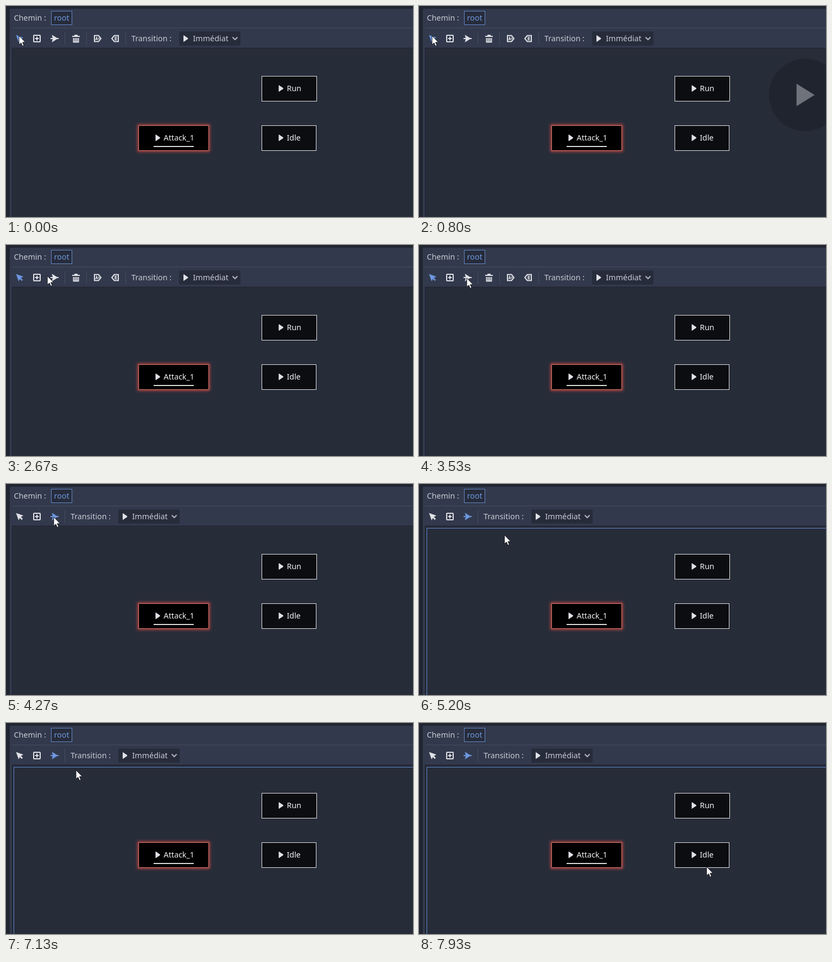
An HTML page that plays this animation: 750 by 389 pixels, repeating every 8 s.

```html
<!DOCTYPE html>
<html lang="fr">
<head>
<meta charset="utf-8">
<title>State machine editor</title>
<style>
  html, body { margin: 0; width: 100%; height: 100%; overflow: hidden; background: #202531; }
  svg { display: block; width: 100vw; height: 100vh; }
  text { font: 14.3px "Noto Sans", "Open Sans", sans-serif; fill: #c9ccd5; }
  .node text { fill: #f1f1f2; }
  .line { fill: none; stroke: #e0e2e7; stroke-width: 2; }
  .solid { fill: #e0e2e7; }
  .sep { stroke: #454c5e; }
</style>
</head>
<body>
<svg viewBox="0 0 750 389" preserveAspectRatio="none">
  <defs>
    <filter id="blur" x="-20%" y="-40%" width="140%" height="180%"><feGaussianBlur stdDeviation="2.6"/></filter>
    <path id="play" d="M1 .7 Q1-.4 2 .2 L9 5 Q10 6 9 7 L2 11.8 Q1 12.4 1 11.3Z"/>
  </defs>

  <rect width="750" height="389" fill="#202531"/>
  <rect x="7" y="5" width="760" height="400" rx="2" fill="#32394c"/>
  <path class="sep" d="M11 40.5H750"/>
  <rect x="11" y="77" width="750" height="330" fill="#1e222d"/>
  <rect x="12" y="78" width="750" height="330" fill="#272c39"/>

  <text x="14.5" y="27">Chemin :</text>
  <rect x="83.500" y="9.500" width="38" height="25" fill="#272c3b" stroke="#6389cb"/>
  <text x="88.500" y="27" style="fill:#6e98dc">root</text>

  <path id="selectTool" d="M18.500 53.500 32 58.300 27.500 60.700 31 64.300 29 66.300 25.500 62.700 23.300 67Z"/>
  <rect class="line" x="51" y="54" width="12" height="12" rx="1"/>
  <path class="line" d="M57 56.500V63.500M53.500 60H60.500"/>
  <path id="connectTool" d="M82 59H86L84.500 53 94 59H97V61H94L84.500 67 86 61H82Z"/>
  <path class="sep" d="M108.500 48V72"/>

  <g id="editTools">
    <path class="line" d="M122 56H136M126 54H132M124.500 59V66.500H133.500V59M127.500 59V66M130.500 59V66"/>
    <path class="sep" d="M148.500 48V72M220.500 48V72"/>
    <path class="line" d="M163 54.500H170.500L175 60 170.500 65.500H163Z"/>
    <path class="line" style="stroke-width:1.200" d="M165 63 167 57.500 169 63M166 61.300H168.500M170 58.500 172 60 170 61.500"/>
    <path class="line" d="M207 54.500H199.500L195 60 199.500 65.500H207Z"/>
    <path class="line" style="stroke-width:1.300" d="M204.500 57.500H201V62.500H204.500M201 60H204.500"/>
  </g>

  <g id="transition">
    <text x="231" y="65">Transition :</text>
    <rect x="319" y="47" width="113" height="26" rx="2" fill="#272c3b"/>
    <use href="#play" class="solid" x="326" y="54"/>
    <text x="344.500" y="65">Immédiat</text>
    <path class="line" style="stroke:#b4b8c2" d="M417.500 57.500 422 62 426.500 57.500"/>
  </g>

  <rect x="244" y="220" width="130" height="47" fill="#d4483f" stroke="#d4483f" stroke-width="4" opacity=".75" filter="url(#blur)"/>
  <g id="nodes"></g>
  <path d="M272 259H346" stroke="#dcdcde" stroke-width="2"/>

  <rect id="focus" x="14.500" y="81.500" width="760" height="330" fill="none" stroke="#6088cc"/>

  <g id="bezel">
    <circle r="40" fill="#000" fill-opacity=".5"/>
    <path d="M-9.500-12.400 10.500 0-9.500 12.400Z" fill="#fff"/>
  </g>

  <path id="cursor" d="M0 0V16.400L3.800 12.900 6.300 18.800 9 17.700 6.500 11.900H11.700Z" fill="#fff" stroke="#15171c" stroke-linejoin="round"/>
</svg>

<script>
const LOOP = 8000, STEP = 200 / 3;
const BLUE = '#6d97e0', LIGHT = '#e0e2e7';
const CONNECT_CLICK = 4190, FOCUS_AT = 5190;
const BEZEL = { start: 460, length: 510 };

// Pointer stops: time, x, y
const stops = [
  [1340, 24, 55], [1850, 163, 60], [2200, 117, 62], [2380, 37, 57], [2540, 76, 57],
  [2620, 76, 57], [3300, 88, 61], [5010, 88, 61], [5760, 522, 268], [6000, 502, 274],
  [6400, 122, 22], [6540, 122, 22], [6860, 526, 258], [7130, 129, 87], [7330, 87, 42],
  [7410, 87, 42], [7930, 530, 265]
];

const $ = id => document.getElementById(id);
const ease = p => p * p * (3 - 2 * p);
const show = (id, on) => $(id).setAttribute('visibility', on ? 'visible' : 'hidden');

function node(name, x, y, width, fill, stroke, iconX) {
  return `<g class="node"><rect x="${x + .5}" y="${y + .5}" width="${width - 1}" height="46" fill="${fill}" stroke="${stroke}"/>
    <use href="#play" class="solid" x="${iconX}" y="${y + 17}"/>
    <text x="${iconX + 16}" y="${y + 28}">${name}</text></g>`;
}

$('nodes').innerHTML =
  node('Run', 471, 129, 102, '#0c0d11', '#e6e7ea', 501.5) +
  node('Idle', 471, 220, 101, '#0c0d11', '#e6e7ea', 501.5) +
  node('Attack_1', 244, 220, 130, '#000', '#d8766e', 274.5);

function pointerAt(t) {
  const next = stops.findIndex(s => s[0] > t);
  if (next === 0) return stops[0].slice(1);
  if (next < 0) return stops[stops.length - 1].slice(1);
  const [t0, x0, y0] = stops[next - 1], [t1, x1, y1] = stops[next];
  const p = ease((t - t0) / (t1 - t0));
  return [x0 + (x1 - x0) * p, y0 + (y1 - y0) * p];
}

function render(t) {
  const connecting = t >= CONNECT_CLICK;
  $('selectTool').setAttribute('fill', connecting ? LIGHT : BLUE);
  $('connectTool').setAttribute('fill', connecting ? BLUE : LIGHT);
  show('editTools', !connecting);
  $('transition').setAttribute('transform', `translate(${connecting ? -112 : 0} 0)`);
  show('focus', t >= FOCUS_AT);

  const p = (t - BEZEL.start) / BEZEL.length;
  show('bezel', p >= 0 && p < 1);
  $('bezel').setAttribute('transform', `translate(711.5 164) scale(${1 + p})`);
  $('bezel').setAttribute('opacity', Math.max(0, Math.min(1, 1 - p)));

  $('cursor').setAttribute('transform', `translate(${pointerAt(t)})`);
}

const begin = performance.now();
function tick() {
  const t = (performance.now() - begin) % LOOP;
  render(Math.floor((t + 4) / STEP) * STEP);
  requestAnimationFrame(tick);
}
tick();
</script>
</body>
</html>
```
